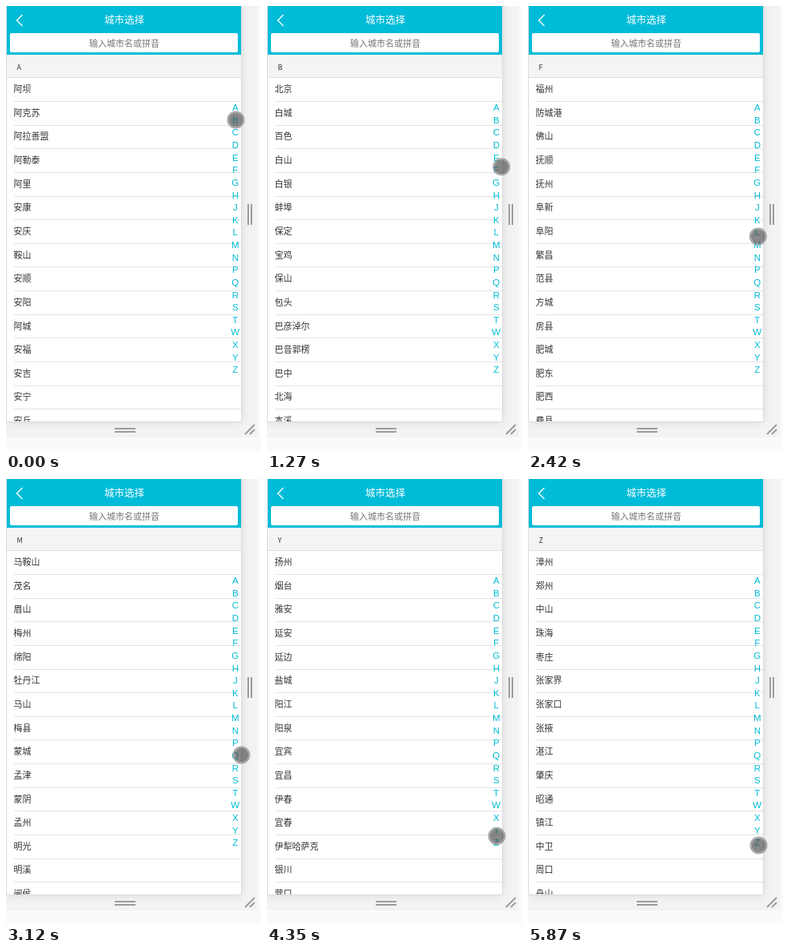
Animation of 319x557 px, one loop 6190 ms. Source, as an HTML page:

```html
<!DOCTYPE html>
<html lang="zh-CN">
<head>
<meta charset="utf-8">
<title>城市选择</title>
<style>
  html, body { margin: 0; width: 100%; height: 100%; overflow: hidden; background: #fafafa; }
  svg { display: block; width: 319px; height: 557px; }
  text { font: 11px "Noto Sans CJK SC", "Noto Sans CJK", sans-serif; fill: #333; }
  .title { font-size: 12.5px; font-weight: 500; fill: #fff; }
  .hint { fill: #757575; }
  .section { font-size: 9px; }
  .index text { font: 11.5px "Liberation Sans", Arial, sans-serif; fill: #00bcd4; }
  .index, .title, .hint { text-anchor: middle; }
  .grip { stroke: #9c9c9c; stroke-width: 2; fill: none; }
  .page { filter: drop-shadow(0 0 6px rgba(0, 0, 0, .13)); }
</style>
</head>
<body>
<svg viewBox="0 0 319 557">
  <defs><clipPath id="screen"><rect x="1" width="293" height="520"/></clipPath></defs>
  <rect width="315" height="540" fill="#f3f3f3"/>
  <rect class="page" x="1" y="-10" width="293" height="530" fill="#fff"/>
  <path d="M294.5 0V520.5H.5V0" fill="none" stroke="#dcdcdc"/>
  <rect id="hover" x="295" width="20" height="521" fill="#000" opacity=".1"/>
  <path class="grip" d="M303 248v26M307 248v26M136 529h26M136 533h26M299 536l12-12M305 536l6-6"/>

  <g clip-path="url(#screen)">
    <rect x="1" y="61" width="293" height="29" fill="#f4f4f4"/>
    <path d="M1 89.5H294" stroke="#dedede"/>
    <text id="section" class="section" x="13.5" y="79.5"></text>
    <g id="rows"></g>
    <rect x="1" width="293" height="61" fill="#00bcd8"/>
    <path d="M20.5 11l-7 7 7 7" fill="none" stroke="#fff" stroke-width="1.3"/>
    <text class="title" x="148" y="22.3">城市选择</text>
    <rect x="5" y="34" width="285" height="24" rx="2" fill="#fff"/>
    <text class="hint" x="148" y="51.2">输入城市名或拼音</text>
  </g>
  <g id="index" class="index"></g>
  <g id="pointer">
    <circle r="9" fill="#464646" fill-opacity=".65"/>
    <circle r="10" fill="none" stroke="#919191" stroke-opacity=".8" stroke-width="2"/>
  </g>
</svg>
<script>
const LOOP = 6190;
const STEP = 78;
const ROW_PITCH = 29.63;

// When each section is shown, its letter and its cities
const pages = [
  [0, 'A', '阿坝 阿克苏 阿拉善盟 阿勒泰 阿里 安康 安庆 鞍山 安顺 安阳 阿城 安福 安吉 安宁 安丘'],
  [720, 'B', '北京 白城 百色 白山 白银 蚌埠 保定 宝鸡 保山 包头 巴彦淖尔 巴音郭楞 巴中 北海 本溪'],
  [1870, 'F', '福州 防城港 佛山 抚顺 抚州 阜新 阜阳 繁昌 范县 方城 房县 肥城 肥东 肥西 费县'],
  [2970, 'M', '马鞍山 茂名 眉山 梅州 绵阳 牡丹江 马山 梅县 蒙城 孟津 蒙阴 孟州 明光 明溪 闽侯'],
  [4250, 'Y', '扬州 烟台 雅安 延安 延边 盐城 阳江 阳泉 宜宾 宜昌 伊春 宜春 伊犁哈萨克 银川 营口'],
  [5870, 'Z', '漳州 郑州 中山 珠海 枣庄 张家界 张家口 张掖 湛江 肇庆 昭通 镇江 中卫 周口 舟山']
];

// Pointer stops: time of leaving, time of arrival, place
const home = [287.5, 142.5];
const stops = [
  [720, 720, 285.5, 148.5],
  [790, 1420, 294, 206.5],
  [2020, 2650, 286.5, 305.5],
  [2970, 3120, 294.5, 345.5],
  [3180, 3950, 287.5, 447],
  [4490, 4720, 286.5, 459.5],
  [4790, 4950, 292.5, 430.5],
  [5030, 5490, 288.5, 458.5]
];

const [section, rows, index, pointer, hover] =
  ['section', 'rows', 'index', 'pointer', 'hover'].map(id => document.getElementById(id));

rows.innerHTML = Array.from({ length: 15 }, (_, i) => {
  const y = i * ROW_PITCH;
  return `<text x="9.5" y="${108.2 + y}"></text>
    <path d="M10 ${Math.round(119 + y) + .5}H294" stroke="#e4e4e4"/>`;
}).join('');
const labels = rows.querySelectorAll('text');

index.innerHTML = [...'ABCDEFGHJKLMNPQRSTWXYZ'].map((letter, i) =>
  `<text x="286.8" y="${131.2 + i * 15.62}">${letter}</text>`).join('');

const easeOut = p => 1 - (1 - p) ** 1.6;

// The pointer advances in even time steps and slows towards each stop
function pointerAt(t) {
  let [x, y] = home;
  for (const [leave, arrive, stopX, stopY] of stops) {
    if (t < leave) break;
    const steps = Math.round((arrive - leave) / STEP) + 1;
    const step = Math.floor((t - leave) / STEP) + 1;
    const part = t >= arrive ? 1 : easeOut(Math.min(1, step / steps));
    x += (stopX - x) * part;
    y += (stopY - y) * part;
  }
  return [x, y];
}

let shown;
function showPage(page) {
  if (page === shown) return;
  shown = page;
  const [, letter, cities] = page;
  section.textContent = letter;
  cities.split(' ').forEach((city, i) => labels[i].textContent = city);
}

function draw(t) {
  showPage(pages.findLast(([at]) => at <= t));
  // The pointer gives way to the resize strip while it is over it
  const onStrip = t >= 1340 && t < 1420;
  hover.style.display = onStrip ? '' : 'none';
  pointer.style.display = onStrip ? 'none' : '';
  pointer.setAttribute('transform', `translate(${pointerAt(t)})`);
}

const began = performance.now();
function tick() {
  draw((performance.now() - began) % LOOP);
  requestAnimationFrame(tick);
}
tick();
</script>
</body>
</html>
```
